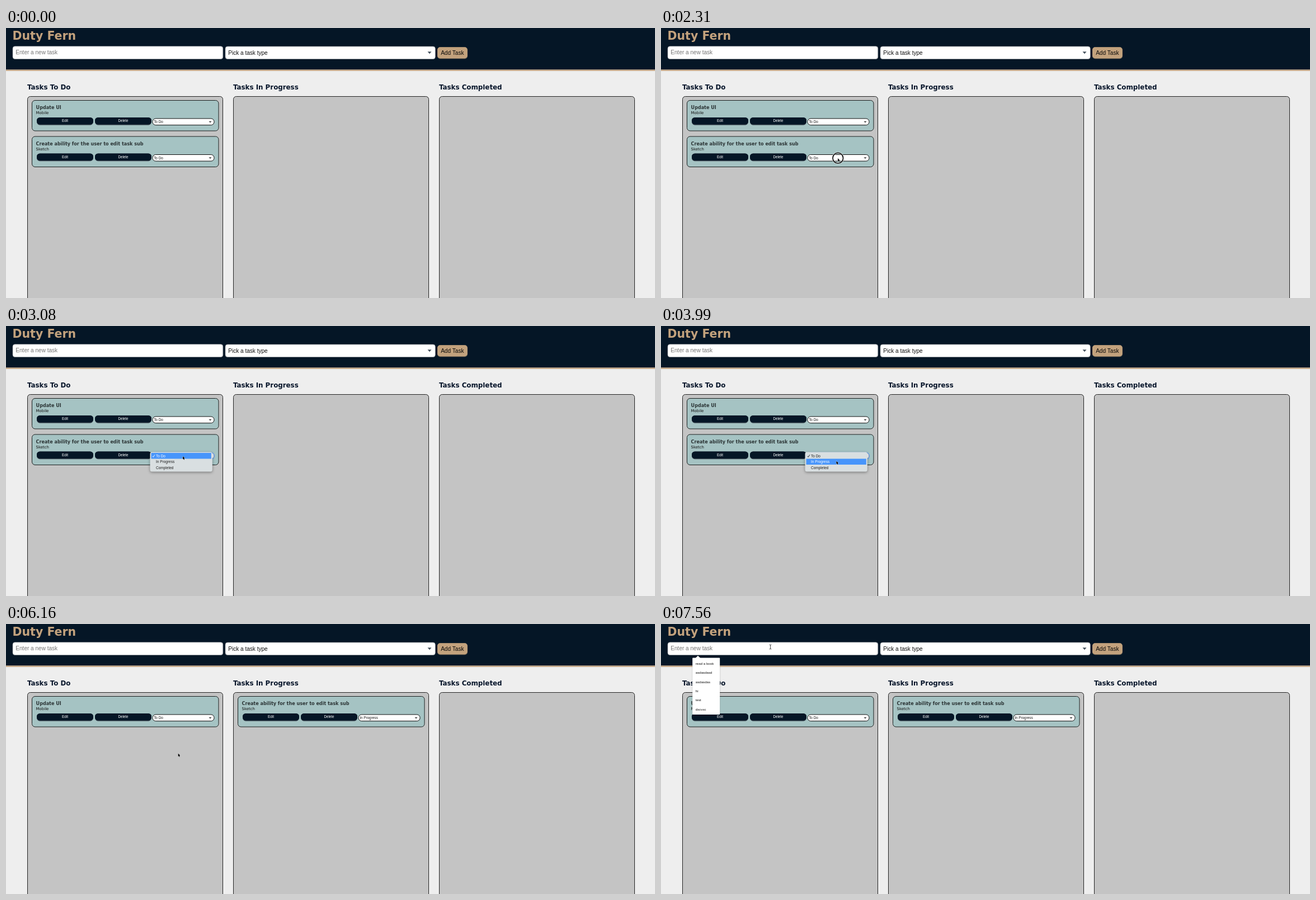
These frames come from a looping animation (1160x483 px, 8000 ms). An HTML page with a canvas:

```html
<!DOCTYPE html>
<html lang="en">
<head>
<meta charset="utf-8">
<title>Task board</title>
<style>
html, body { margin: 0; width: 100%; height: 100%; overflow: hidden; background: #eee; }
canvas { display: block; }
</style>
</head>
<body>
<canvas id="stage" width="1160" height="483"></canvas>
<script>
const ctx = document.getElementById('stage').getContext('2d');
const LOOP = 8000, STEP = 70;
const NAVY = '#051626', TAN = '#c3a27d', INK = '#1c1c1c';
const WIDE = 'Verdana, "DejaVu Sans", sans-serif';
const PLAIN = '"Liberation Sans", Arial, sans-serif';
const STATES = ['To Do', 'In Progress', 'Completed'];
const HISTORY = ['read a book', 'asdasdasd', 'asdasdas', 'hi', 'test', 'dxcvxc'];

// [start, end, x0, y0, x1, y1]
const MOVES = [
  [140, 560, 850, 483, 260, 296],
  [910, 1540, 260, 296, 316, 233],
  [3290, 3640, 316, 233, 313.5, 241.5],
  [6040, 6930, 313.5, 241.5, 195.5, 41]
];
// [on, off, x, y]
const CLICKS = [
  [1680, 1890, 316.3, 232.7],
  [2310, 2450, 316.3, 232.7],
  [3780, 3920, 313.5, 241.6],
  [5110, 5180, 313.5, 241.6],
  [7000, 7140, 193.5, 43.5]
];

const clamp = v => Math.max(0, Math.min(1, v));
const smooth = p => p * p * (3 - 2 * p);

function text(str, x, y, size, color, family = PLAIN, weight = 'normal', align = 'left') {
  ctx.font = `${weight} ${size}px ${family}`;
  ctx.textAlign = align;
  ctx.fillStyle = color;
  ctx.fillText(str, x, y);
}

function box(x, y, w, h, r, fill, stroke, line = 1) {
  ctx.beginPath();
  ctx.roundRect(x, y, w, h, r);
  ctx.fillStyle = fill;
  ctx.fill();
  if (stroke) {
    ctx.strokeStyle = stroke;
    ctx.lineWidth = line;
    ctx.stroke();
  }
}

function poly(points, fill) {
  ctx.beginPath();
  points.forEach(([x, y]) => ctx.lineTo(x, y));
  ctx.closePath();
  ctx.fillStyle = fill;
  ctx.fill();
}

function caretDown(x, y, w, h, color) {
  poly([[x - w / 2, y], [x + w / 2, y], [x, y + h]], color);
}

function header() {
  ctx.fillStyle = NAVY;
  ctx.fillRect(0, 0, 1160, 74.5);
  ctx.fillStyle = TAN;
  ctx.fillRect(0, 74.5, 1160, 2.2);
  text('Duty Fern', 11.5, 21, 20.5, TAN, WIDE, 'bold');
  box(12, 32.7, 375.8, 22.8, 4, '#fff', '#8b8f94', 0.7);
  text('Enter a new task', 17.3, 47.4, 10.05, '#757575');
  box(392, 33, 375.3, 22.5, 4, '#fff', '#8b8f94', 0.7);
  text('Pick a task type', 397.3, 47.8, 10.05, '#111');
  caretDown(757, 42.3, 7, 4, '#44515d');
  box(771, 34.3, 54, 21, 5, '#6f6353');
  box(771, 34.3, 53.7, 19.9, 5, TAN);
  text('Add Task', 797.8, 47.8, 10.05, '#080808', PLAIN, 'normal', 'center');
}

function column(i, name) {
  const x = 38 + 368 * i;
  text(name, x, 109.6, 11.85, '#07152a', WIDE, 'bold');
  box(x + 0.5, 122.5, 349, 400, 5, '#c4c4c4', '#222');
}

function button(x, y, label) {
  box(x, y, 101, 13.7, 5.5, '#3c4650');
  box(x, y, 101, 12.6, 5.5, NAVY);
  text(label, x + 50.5, y + 8.4, 6.3, '#fff', PLAIN, 'normal', 'center');
}

function card(x, y, name, kind, state) {
  box(x + 0.5, y + 0.5, 333.5, 54.5, 5.5, '#a5c3c3', '#1a1f1f');
  text(name, x + 7.6, y + 16.2, 8.05, '#2c3536', WIDE, 'bold');
  text(kind, x + 7.6, y + 25.2, 6.95, '#111', WIDE);
  button(x + 9, y + 31, 'Edit');
  button(x + 113, y + 31, 'Delete');
  box(x + 216, y + 33, 110, 11.6, 5.6, '#fff', '#111');
  text(state, x + 218.2, y + 41, 6.35, INK);
  caretDown(x + 319, y + 37.7, 5, 2.7, '#444');
}

function menu(active, alpha) {
  ctx.save();
  ctx.globalAlpha = alpha;
  ctx.strokeStyle = '#7faee6';
  ctx.lineWidth = 1.8;
  ctx.beginPath();
  ctx.roundRect(262, 226.3, 110.5, 12.2, 6);
  ctx.stroke();
  ctx.save();
  ctx.shadowColor = 'rgba(0,0,0,.38)';
  ctx.shadowBlur = 5;
  ctx.shadowOffsetY = 1.5;
  box(257.5, 225.5, 111.3, 35, 3.5, '#d9dfe1');
  ctx.restore();
  if (active >= 0) {
    ctx.fillStyle = '#4795fb';
    ctx.fillRect(259.5, 227 + 10.5 * active, 107.3, 10.5);
  }
  STATES.forEach((s, i) =>
    text(s, 268, 234.7 + 10.5 * i, 6.5, i === active ? '#fff' : INK));
  ctx.strokeStyle = active === 0 ? '#fff' : INK;
  ctx.lineWidth = 0.9;
  ctx.beginPath();
  ctx.moveTo(261.8, 232.8);
  ctx.lineTo(263.2, 234.5);
  ctx.lineTo(265.8, 230.4);
  ctx.stroke();
  ctx.restore();
}

function suggestions(alpha) {
  ctx.save();
  ctx.globalAlpha = alpha;
  ctx.save();
  ctx.shadowColor = 'rgba(0,0,0,.3)';
  ctx.shadowBlur = 2;
  box(56.2, 60.5, 49, 101.5, 1, '#fff');
  ctx.restore();
  poly([[61.5, 61], [66, 56.8], [70.5, 61]], '#fff');
  HISTORY.forEach((s, i) => text(s, 61.8, 72.8 + 16.35 * i, 6.15, '#111'));
  ctx.restore();
}

function ring(x, y) {
  ctx.beginPath();
  ctx.arc(x, y, 9.3, 0, 7);
  ctx.strokeStyle = 'rgba(255,255,255,.8)';
  ctx.lineWidth = 3;
  ctx.stroke();
  ctx.strokeStyle = '#0b0b0b';
  ctx.lineWidth = 1.7;
  ctx.stroke();
}

function arrow(x, y) {
  ctx.beginPath();
  [[0, 0], [0, 5.6], [1.2, 4.5], [2.1, 6.5], [3.1, 6.1], [2.2, 4.1], [3.9, 4]]
    .forEach(([a, b]) => ctx.lineTo(x + a, y + b));
  ctx.closePath();
  ctx.lineWidth = 0.9;
  ctx.strokeStyle = 'rgba(255,255,255,.75)';
  ctx.stroke();
  ctx.fillStyle = '#000';
  ctx.fill();
}

function beam(x, y) {
  ctx.strokeStyle = '#333';
  ctx.lineWidth = 0.9;
  ctx.beginPath();
  for (const s of [-1, 1]) {
    ctx.moveTo(x - 1.8, y + 4 * s);
    ctx.quadraticCurveTo(x, y + 4 * s, x, y + 2.8 * s);
    ctx.quadraticCurveTo(x, y + 4 * s, x + 1.8, y + 4 * s);
  }
  ctx.moveTo(x, y - 3);
  ctx.lineTo(x, y + 3);
  ctx.stroke();
}

function pointer(t) {
  const move = MOVES.filter(m => t >= m[0] + STEP).pop();
  if (!move) return null;
  const [start, end, x0, y0, x1, y1] = move;
  const p = smooth(clamp((t - start) / (end - start)));
  // the last sweep sets off once its first step is due
  if (start === 6040 && t < 6160) return [x0, y0];
  return [x0 + (x1 - x0) * p, y0 + (y1 - y0) * p];
}

function draw(t) {
  ctx.fillStyle = '#eee';
  ctx.fillRect(0, 0, 1160, 483);
  header();
  ['Tasks To Do', 'Tasks In Progress', 'Tasks Completed'].forEach((n, i) => column(i, n));

  const moved = t >= 4200;
  card(46, 129, 'Update UI', 'Mobile', STATES[0]);
  card(moved ? 414 : 46, moved ? 129 : 193.5,
    'Create ability for the user to edit task sub', 'Sketch', STATES[moved ? 1 : 0]);

  if (t >= 2450 && t < 4270) {
    const blink = t >= 3920 && t < 3990;
    const fade = t < 4130 ? clamp((t - 2380) / 140) : clamp((4270 - t) / 210);
    menu(blink ? -1 : t < 3500 ? 0 : 1, fade);
  }
  if (t >= 7070) suggestions(t < 7140 ? 0.8 : 1);
  if (t >= 7070 && t < 7560) {
    ctx.fillStyle = '#222';
    ctx.fillRect(17, 38, 0.8, 12);
  }

  for (const [on, off, x, y] of CLICKS) if (t >= on && t < off) ring(x, y);
  const pos = pointer(t);
  if (pos) (pos[1] < 56 ? beam : arrow)(...pos);
}

const begin = performance.now();
function tick() {
  const t = (performance.now() - begin) % LOOP;
  draw(Math.floor(t / STEP) * STEP);
  requestAnimationFrame(tick);
}
tick();
</script>
</body>
</html>
```
